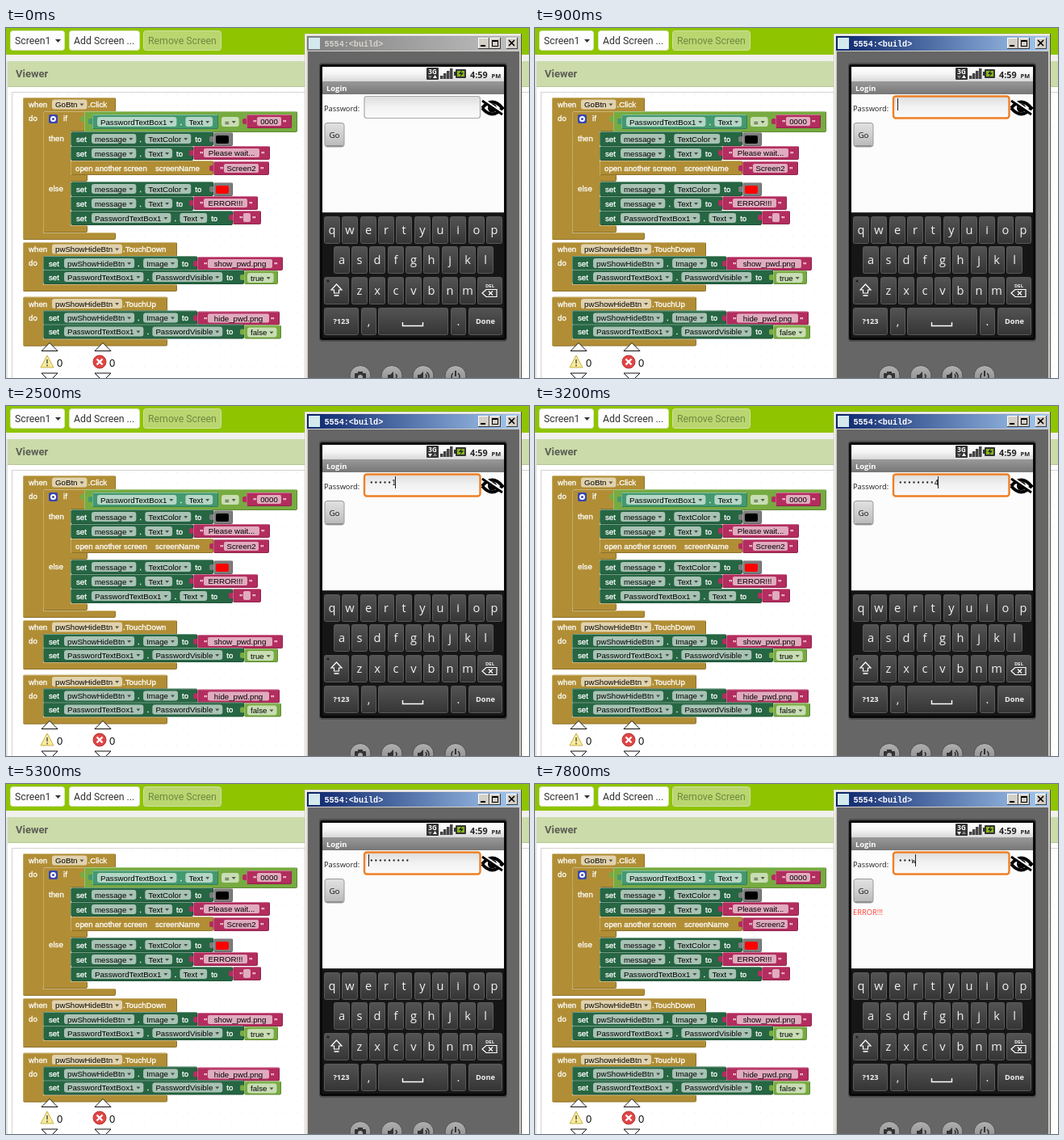
Animation, 648 px wide and 433 px high, one loop 8 s. Source, as an HTML page with a canvas:

```html
<!DOCTYPE html>
<html lang="en">
<head>
<meta charset="utf-8">
<title>Password screen</title>
<style>
html, body { margin: 0; width: 100%; height: 100%; overflow: hidden; background: #fff; }
canvas { display: block; }
</style>
</head>
<body>
<canvas id="stage" width="648" height="433"></canvas>
<script>
const c = document.getElementById('stage').getContext('2d');
const SANS = '"Liberation Sans", Arial, sans-serif';
const UI = '"Open Sans", "Noto Sans", sans-serif';
const MONO = '"Noto Sans Mono", "DejaVu Sans Mono", monospace';
const ROBOTO = 'Roboto, Arial, sans-serif';
const BLOCK = '9.7px ' + SANS;
const GOLD = '#b18e35', SET = '#266643', GET = '#439970', LOGIC = '#77ab41', STR = '#b32d5e';

const LOOP = 8000, PITCH = 5.57, FIELD_X = 450;
const first = { text: 'asdfg1234', at: [1200, 1600, 1800, 2000, 2300, 2500, 2700, 3000, 3200] };
const second = { text: 'asdw', at: [7400, 7600, 7700, 7800] };
const within = (t, spans) => spans.some(([a, b]) => t >= a && t < b);

function rect(x, y, x2, y2, fill) {
  c.fillStyle = fill;
  c.fillRect(x, y, x2 - x, y2 - y);
}
function paint(fill, stroke, width) {
  if (fill) { c.fillStyle = fill; c.fill(); }
  if (stroke) { c.strokeStyle = stroke; c.lineWidth = width; c.stroke(); }
}
function round(x, y, x2, y2, r, fill, stroke, width = 1) {
  c.beginPath();
  c.roundRect(x, y, x2 - x, y2 - y, r);
  paint(fill, stroke, width);
}
function text(s, x, y, font, color = '#fff', align = 'left') {
  c.font = font;
  c.fillStyle = color;
  c.textAlign = align;
  c.fillText(s, x, y);
}
function poly(points, fill, stroke, width = 1, open) {
  c.beginPath();
  for (let i = 0; i < points.length; i += 2) c.lineTo(points[i], points[i + 1]);
  if (!open) c.closePath();
  paint(fill, stroke, width);
}
function disc(x, y, r, fill, stroke, width = 1) {
  c.beginPath();
  c.arc(x, y, r, 0, 7);
  paint(fill, stroke, width);
}
function shade(x, y, x2, y2, ...colors) {
  const g = c.createLinearGradient(x, y, x2, y2);
  colors.forEach((k, i) => g.addColorStop(i / (colors.length - 1), k));
  return g;
}

// Code blocks
function block(x, y, x2, y2, color) {
  round(x, y, x2, y2, 2, color);
  rect(x + 1, y, x2 - 1, y + 1, 'rgba(255,255,255,.35)');
  rect(x, y + 1, x + 1, y2 - 1, 'rgba(255,255,255,.25)');
  rect(x + 1, y2 - 1, x2 - 1, y2, 'rgba(0,0,0,.2)');
  rect(x2 - 1, y + 1, x2, y2 - 1, 'rgba(0,0,0,.2)');
}
function label(s, x, y) {
  text(s, x, y, BLOCK);
  c.strokeStyle = '#fff';
  c.lineWidth = .3;
  c.strokeText(s, x, y);
}
function tab(x, y, color) { round(x - 5, y + 5, x + 1, y + 12, 2, color); }
function pill(x, y, name) {
  c.font = BLOCK;
  const end = x + c.measureText(name).width + 16;
  round(x, y + 3, end, y + 15, 3, 'rgba(255,255,255,.6)');
  text(name, x + 4, y + 12.5, BLOCK, '#000');
  poly([end - 9, y + 8, end - 4, y + 8, end - 6.5, y + 11], 'rgba(0,0,0,.6)');
  return end;
}
function property(x, y, owner, name) {
  const end = pill(x, y, owner);
  label('.', end + 4, y + 12.5);
  return pill(end + 11, y, name);
}
function setter(x, y, x2, owner, name) {
  block(x, y, x2, y + 18, SET);
  label('set', x + 7, y + 12.5);
  label('to', property(x + 26, y, owner, name) + 5, y + 12.5);
}
function string(x, y, x2, value) {
  tab(x, y, STR);
  block(x, y, x2, y + 17, STR);
  text('"', x + 8, y + 13, 'bold ' + BLOCK);
  text('"', x2 - 11, y + 13, 'bold ' + BLOCK);
  round(x + 13, y + 3, x2 - 13, y + 14, 2, 'rgba(255,255,255,.6)');
  text(value, (x + x2) / 2, y + 12, BLOCK, '#000', 'center');
}
function swatch(x, y, color) {
  tab(x, y, '#7d7d7d');
  block(x, y, x + 24, y + 17, '#7d7d7d');
  round(x + 3, y + 4, x + 19, y + 14, 2, color);
}
function bool(x, y, x2, value) {
  tab(x, y, LOGIC);
  block(x, y, x2, y + 17, LOGIC);
  pill(x + 4, y, value);
}
function eventBlock(y, x2, foot, name, action) {
  block(21, y + 8, 46, foot, GOLD);
  block(21, y, x2, y + 18, GOLD);
  block(21, foot - 9, x2, foot, GOLD);
  rect(22, y + 9, 46, foot - 1, GOLD);
  label('when', 28, y + 12);
  label('.' + action, pill(57, y - .5, name) + 1, y + 12);
  label('do', 28, y + 29);
}
function imageEvent(y, x2, action, file, fileEnd, visible, visibleEnd) {
  eventBlock(y, x2, y + 61, 'pwShowHideBtn', action);
  setter(46, y + 17, 237, 'pwShowHideBtn', 'Image');
  string(237, y + 18, fileEnd, file);
  setter(46, y + 34, 295, 'PasswordTextBox1', 'PasswordVisible');
  bool(295, y + 35, visibleEnd, visible);
}

function drawEditor() {
  rect(0, 0, 648, 433, '#fff');
  rect(0, 0, 648, 33, '#8fc400');
  rect(0, 33, 648, 41, '#f0f0ee');
  rect(2, 41, 648, 73, '#cbdbaa');
  rect(2, 72, 648, 73, '#b5c795');
  rect(0, 41, 2, 433, '#e2e2e2');
  const button = '12.3px ' + ROBOTO;
  round(5.5, 3.5, 72.5, 27.5, 3, '#fdfdfd', '#d8e4b8');
  text('Screen1', 11, 20, button, '#333');
  poly([61, 14, 68, 14, 64.5, 18], '#333');
  round(78.5, 3.5, 165.5, 27.5, 3, '#fdfdfd', '#d8e4b8');
  text('Add Screen ...', 84, 20, button, '#333');
  round(170.5, 3.5, 266.5, 27.5, 3, '#b9d670', '#d0e29c');
  text('Remove Screen', 176, 20, button, '#6f8a40');
  text('Viewer', 12, 61, 'bold 13px ' + ROBOTO, '#5c5f55');
  for (let y = 82; y < 433; y += 13.5)
    for (let x = 9; x < 648; x += 13.5) rect(x | 0, y | 0, (x | 0) + 1, (y | 0) + 1, '#ececec');
  rect(7, 79, 648, 80, '#d4d4d4');
  rect(7, 79, 8, 433, '#d4d4d4');

  eventBlock(86, 136, 262, 'GoBtn', 'Click');
  block(46, 104, 80, 253, GOLD);
  block(46, 103, 99, 128, GOLD);
  block(46, 181, 101, 190, GOLD);
  block(46, 244, 101, 253, GOLD);
  rect(47, 105, 80, 252, GOLD);
  round(53, 107, 64, 118, 2, '#3846b0');
  disc(58.5, 112.5, 2.5, null, '#fff', 2);
  label('if', 71, 115);
  label('then', 53, 140);
  label('else', 53, 202);
  tab(97, 104, LOGIC);
  block(97, 103, 361, 129, LOGIC);
  tab(107, 107, GET);
  block(107, 107, 263, 125, GET);
  property(113, 107, 'PasswordTextBox1', 'Text');
  pill(267, 107, '=');
  string(298, 107, 354, '0000');

  for (const [y, color, message, x2] of [[128, '#000', 'Please wait...', 327], [190, '#f00', 'ERROR!!!', 312]]) {
    setter(80, y, 257, 'message', 'TextColor');
    swatch(257, y + 1, color);
    setter(80, y + 18, 232, 'message', 'Text');
    string(232, y + 18, x2, message);
  }
  block(80, 164, 257, 182, GOLD);
  label('open another screen', 86, 176.5);
  label('screenName', 185, 176.5);
  string(257, 165, 326, 'Screen2');
  setter(80, 226, 281, 'PasswordTextBox1', 'Text');
  string(281, 226, 316, '');
  imageEvent(265, 212, 'TouchDown', 'show_pwd.png', 343, 'true', 337);
  imageEvent(332.5, 200, 'TouchUp', 'hide_pwd.png', 339, 'false', 341);

  for (const x of [54, 120]) {
    poly([x, 389.5, x + 10, 399.5, x - 10, 399.5], '#fff', '#111');
    poly([x, 437, x + 10, 427, x - 10, 427], '#fff', '#111');
  }
  poly([51, 405, 59, 420, 43, 420], '#f8ec9a', '#c9b04c');
  rect(50, 410, 52, 415, '#776');
  rect(50, 416.5, 52, 418.5, '#776');
  disc(116, 413, 8, '#e04545', '#b73434');
  poly([112.5, 409.5, 119.5, 416.5], null, '#fff', 2.4);
  poly([119.5, 409.5, 112.5, 416.5], null, '#fff', 2.4);
  text('0', 63, 419, '13px ' + SANS, '#111');
  text('0', 128, 419, '13px ' + SANS, '#111');
}

// Phone window
function drawWindow(active) {
  rect(370, 7, 639, 433, '#d4d0c8');
  rect(371, 8, 638, 9, '#fff');
  rect(371, 8, 372, 433, '#fff');
  rect(638, 7, 639, 433, '#505050');
  rect(373, 10, 636, 28, active
    ? shade(373, 0, 636, 0, '#0a246a', '#a6caf0')
    : shade(373, 0, 636, 0, '#808080', '#c0c0c0'));
  rect(375, 12, 389, 26, '#d3e9ee');
  text('5554:<build>', 394.5, 23, 'bold 10.1px "Liberation Mono", monospace', active ? '#fff' : '#d8d5ce');
  for (const x of [585, 599, 620]) {
    rect(x, 12, x + 14, 26, '#404040');
    rect(x, 12, x + 13, 25, '#fff');
    rect(x + 1, 13, x + 13, 25, '#d4d0c8');
  }
  rect(588, 21, 594, 23, '#000');
  c.strokeStyle = '#000';
  c.lineWidth = 1;
  c.strokeRect(602.5, 15.5, 7, 7);
  rect(602, 15, 610, 17, '#000');
  poly([623, 15, 630, 22], null, '#000', 1.6);
  poly([630, 15, 623, 22], null, '#000', 1.6);

  rect(374, 29, 636, 433, '#666');
  round(388, 43, 621, 388, 4, '#4c4c4c');
  round(389, 45, 620, 386, 3, '#080808');
  for (const x of [439, 478, 517, 557]) disc(x, 430.5, 13, shade(0, 418, 0, 440, '#b0b0b0', '#8c8c8c'), '#505050');
  const ink = '#333';
  round(432, 427, 446, 437, 1, ink);
  rect(436, 425, 442, 428, ink);
  disc(439, 432, 3, '#aaa');
  for (const x of [473, 510]) poly([x, 429, x + 3, 429, x + 7, 425, x + 7, 437, x, 437], ink);
  c.lineWidth = 1.5;
  c.strokeStyle = ink;
  for (const [x, r] of [[481, 3], [518, 3], [518, 6]]) {
    c.beginPath();
    c.arc(x, 431, r, -1, 1);
    c.stroke();
  }
  c.beginPath();
  c.arc(557, 431, 5, -.9, 4.04);
  c.stroke();
  rect(556, 424, 558, 431, ink);
}

function drawStatus(busy) {
  rect(392, 48, 617, 66, shade(0, 48, 0, 66, '#fff', '#f4f4f4', '#d8d8d8'));
  round(521, 49, 536, 64, 1, '#333');
  text('3G', 528.5, 56.5, 'bold 8px ' + UI, '#fff', 'center');
  poly([523, 59, 528, 59, 525.5, 63], busy ? '#fff' : '#888');
  poly([529, 62, 534, 62, 531.5, 58], busy ? '#888' : '#fff');
  for (let i = 0; i < 4; i++) rect(538 + i * 4, 59 - i * 3, 541.5 + i * 4, 63, '#444');
  round(557, 51, 570, 62, 1, '#333');
  rect(555, 54, 557, 59, '#333');
  rect(559, 53, 568, 60, '#86b71c');
  poly([565, 52, 561, 57, 564, 57, 562, 61, 567, 55.5, 564, 55.5], '#222');
  text('4:59', 575, 61.5, 'bold 10.8px ' + UI, '#222');
  text('PM', 601.5, 61.5, 'bold 7.4px ' + UI, '#222');
  rect(392, 66, 617, 82, shade(0, 66, 0, 82, '#999', '#777'));
  text('Login', 397, 77.5, 'bold 9.4px ' + UI);
}

function drawEye(open) {
  c.lineWidth = 4;
  c.strokeStyle = '#000';
  c.beginPath();
  c.moveTo(590, 99);
  c.quadraticCurveTo(602.5, 84, 615, 99);
  c.quadraticCurveTo(602.5, 114, 590, 99);
  c.stroke();
  disc(602.5, 99, 5.5, '#000');
  disc(601, 97.5, 1.5, '#fff');
  if (open) return;
  poly([592, 89.5, 616, 105.5], null, '#fff', 3.5);
  poly([590, 90, 615, 107], null, '#000', 2.8);
}

function drawForm(t) {
  rect(392, 82, 617, 228, '#fcfcfc');
  text('Password:', 394, 103, '9.3px ' + UI, '#222');
  const focused = t >= 800, reveal = within(t, [[3900, 4500], [4900, 5300]]);
  const fill = shade(0, 84, 0, 111, '#dcdcdc', '#f2f2f2', '#fafafa');
  round(444, 84.5, 587.5, 111.5, 3, fill, focused ? '#ee8026' : '#a9a9a9', focused ? 2.4 : 1.2);

  const sent = t >= 5900, entry = sent ? second : first;
  const count = entry.at.filter(a => a <= t).length;
  const age = t - entry.at[count - 1];
  for (let i = 0; i < count; i++) {
    const x = FIELD_X + (i + .5) * PITCH;
    const fresh = i === count - 1 && age < 700;
    if (reveal || fresh) text(entry.text[i], x, 98, '9.6px ' + MONO, '#111', 'center');
    else disc(x, 94.5, 1.15, '#222');
  }
  const blinkOff = within(t, [[0, 800], [3600, 3900], [4300, 4500], [5900, 6400], [6900, 7400]]);
  const atStart = t >= 3900 && !sent;
  const caret = Math.floor(FIELD_X - .6 + (atStart ? 0 : count * PITCH));
  if (!blinkOff) rect(caret, 87, caret + 1, 102, '#222');

  const pressed = within(t, [[5800, 5900]]);
  round(395, 117.5, 419, 147, 3, pressed
    ? shade(0, 117, 0, 147, '#ffc04a', '#f08a10')
    : shade(0, 117, 0, 147, '#e2e2e2', '#cfcfcf', '#b8b8b8'), '#999');
  rect(397, 145, 417, 147, '#909090');
  text('Go', 407, 136, '9.8px ' + UI, '#111', 'center');
  drawEye(reveal);
  if (sent) text('ERROR!!!', 394, 162, '9.3px ' + UI, '#ff3c32');
}

function key(x, y, w, name, font = '14.6px ' + UI, drop = 22) {
  round(x + .5, y + .5, x + w - .5, y + 33.5, 2, shade(0, y, 0, y + 34, '#545454', '#444', '#343434'), '#5a5a5a');
  text(name, x + w / 2, y + drop, font, '#f2f2f2', 'center');
}
function drawKeyboard() {
  rect(392, 228, 617, 383, '#161616');
  rect(392, 228, 617, 229, '#444');
  [['qwertyuiop', 394, 233], ['asdfghjkl', 405.5, 270], ['zxcvbnm', 428, 308]].forEach(([keys, x, y]) =>
    [...keys].forEach((k, i) => key(Math.round(x + i * 22.35), y, 20, k)));
  const small = 'bold 9.2px ' + UI;
  key(394, 308, 31, '');
  key(584, 308, 31, 'DEL', 'bold 6px ' + UI, 13);
  key(394, 346, 43, '?123', small, 20);
  key(440, 346, 19, ',');
  key(461, 346, 87, '');
  key(551, 346, 19, '.');
  key(573, 346, 42, 'Done', small, 20);
  disc(399, 313, 1.6, '#222');
  poly([409.5, 317, 416, 324, 412.5, 324, 412.5, 328, 406.5, 328, 406.5, 324, 403, 324], null, '#fff', 1.2);
  poly([406.5, 331, 412.5, 331], null, '#fff', 1.3);
  poly([590, 328, 595, 323.5, 608, 323.5, 608, 332.5, 595, 332.5], null, '#fff', 1.2);
  poly([598, 325.5, 603, 330.5], null, '#fff', 1.2);
  poly([603, 325.5, 598, 330.5], null, '#fff', 1.2);
  poly([491.5, 364, 491.5, 368.5, 516.5, 368.5, 516.5, 364], null, '#fff', 1.4, true);
}

function frame(now) {
  const t = now % LOOP;
  drawEditor();
  drawWindow(t >= 700);
  drawStatus(within(t, [[1800, 2700], [4500, 5300], [6400, LOOP]]));
  drawForm(t);
  drawKeyboard();
  requestAnimationFrame(frame);
}
requestAnimationFrame(frame);
</script>
</body>
</html>
```
